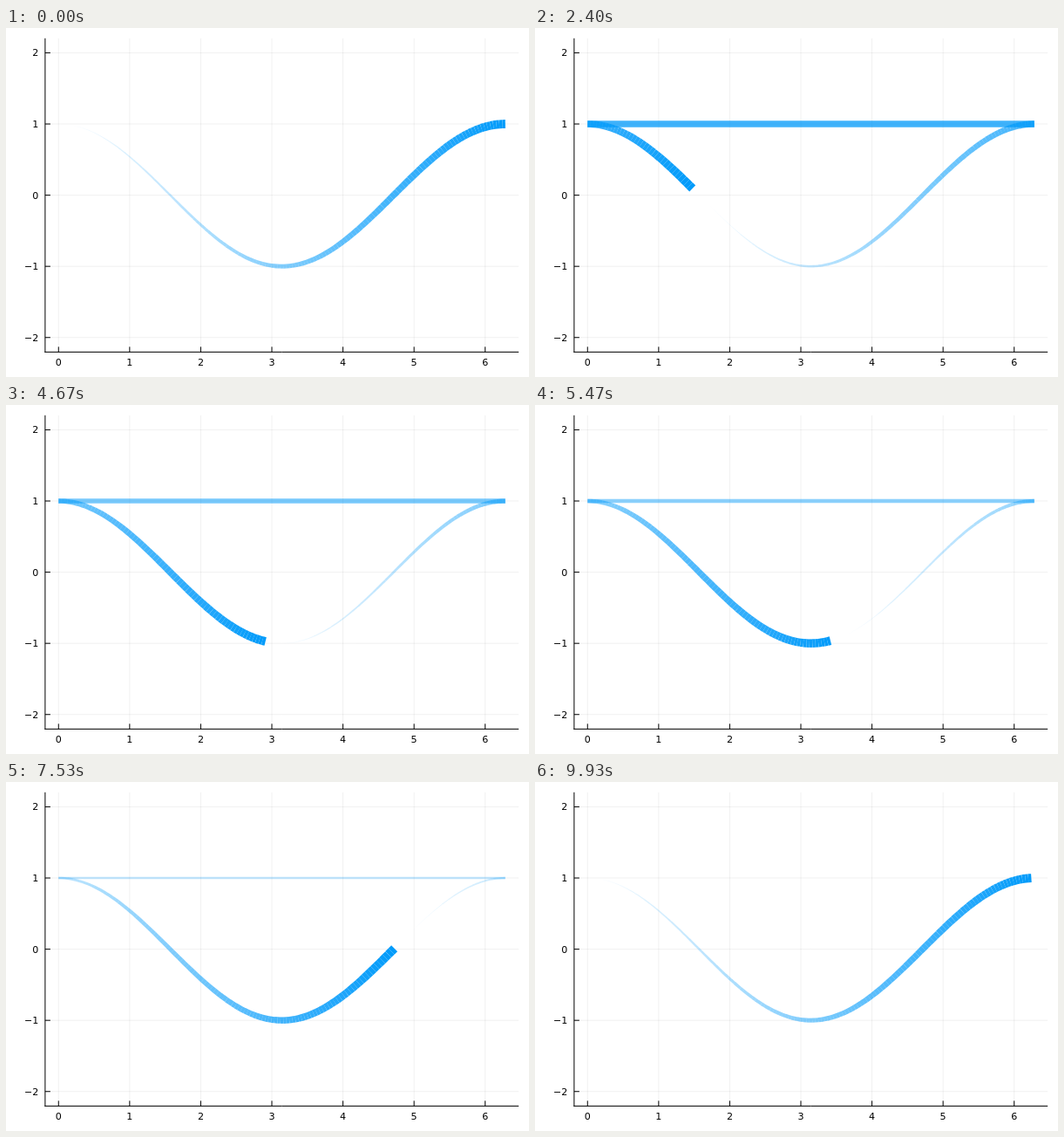
Recreate the animation shown at these times as an HTML page with a canvas. Size 600x400 px, loop 9.99 s.

```html
<!DOCTYPE html>
<html lang="en">
<head>
<meta charset="utf-8">
<title>Cosine trail</title>
<style>
  html, body { margin: 0; width: 100%; height: 100%; overflow: hidden; background: #fff; }
  canvas { display: block; }
</style>
</head>
<body>
<canvas id="plot" width="600" height="400"></canvas>
<script>
const ctx = document.getElementById('plot').getContext('2d');

const LOOP_MS = 9990;
const COUNT = 150;
const MAX_WIDTH = 10;
const TICK = 6;
const BLUE = '#009afa';
const area = { left: 44.9, right: 588.2, top: 11.8, bottom: 371.4 };

// The x range is 0..2π widened by 3% on both sides; both axes share one scale.
const scale = (area.right - area.left) / (2 * Math.PI * 1.06);
const originX = area.left + 0.06 * Math.PI * scale;
const originY = (area.top + area.bottom) / 2;
const toX = x => originX + x * scale;
const toY = y => originY - y * scale;

const xTicks = [0, 1, 2, 3, 4, 5, 6];
const yTicks = [-2, -1, 0, 1, 2];

const points = Array.from({ length: COUNT }, (_, i) => {
  const t = 2 * Math.PI * i / (COUNT - 1);
  return [toX(t), toY(Math.cos(t))];
});

function line(x1, y1, x2, y2, width, alpha = 1) {
  ctx.globalAlpha = alpha;
  ctx.lineWidth = width;
  ctx.beginPath();
  ctx.moveTo(x1, y1);
  ctx.lineTo(x2, y2);
  ctx.stroke();
}

function label(value, x, y, align) {
  ctx.textAlign = align;
  ctx.fillText(String(value).replace('-', '\u2212'), x, y);
}

function drawAxes() {
  const { left, right, top, bottom } = area;
  ctx.strokeStyle = ctx.fillStyle = '#000';
  for (const v of xTicks) line(toX(v), top, toX(v), bottom, 0.6, 0.1);
  for (const v of yTicks) line(left, toY(v), right, toY(v), 0.6, 0.1);

  line(left - 0.5, bottom, right, bottom, 1);
  line(left, top, left, bottom + 0.5, 1);
  for (const v of xTicks) line(toX(v), bottom, toX(v), bottom - TICK, 1);
  for (const v of yTicks) line(left, toY(v), left + TICK, toY(v), 1);

  ctx.font = '11.1px "DejaVu Sans", sans-serif';
  for (const v of xTicks) label(v, toX(v), 387, 'center');
  for (const v of yTicks) label(v, 37.3, toY(v) + 4, 'right');
}

// Segments grow wider and more opaque from the tail to the head.
function drawTrail(start) {
  ctx.strokeStyle = BLUE;
  for (let k = 1; k < COUNT - 1; k++) {
    const from = points[(start + k) % COUNT];
    const to = points[(start + k + 1) % COUNT];
    const weight = k / (COUNT - 1);
    line(...from, ...to, MAX_WIDTH * weight, weight);
  }
}

// 15 steps per second, each change falling on the nearest 10 ms.
function stepAt(ms) {
  const ticks = Math.floor(ms % LOOP_MS / 10);
  return Math.floor((ticks + 0.5) * 0.15);
}

function render() {
  ctx.globalAlpha = 1;
  ctx.fillStyle = '#fff';
  ctx.fillRect(0, 0, 600, 400);
  drawAxes();
  drawTrail(stepAt(performance.now()));
  requestAnimationFrame(render);
}

render();
</script>
</body>
</html>
```
